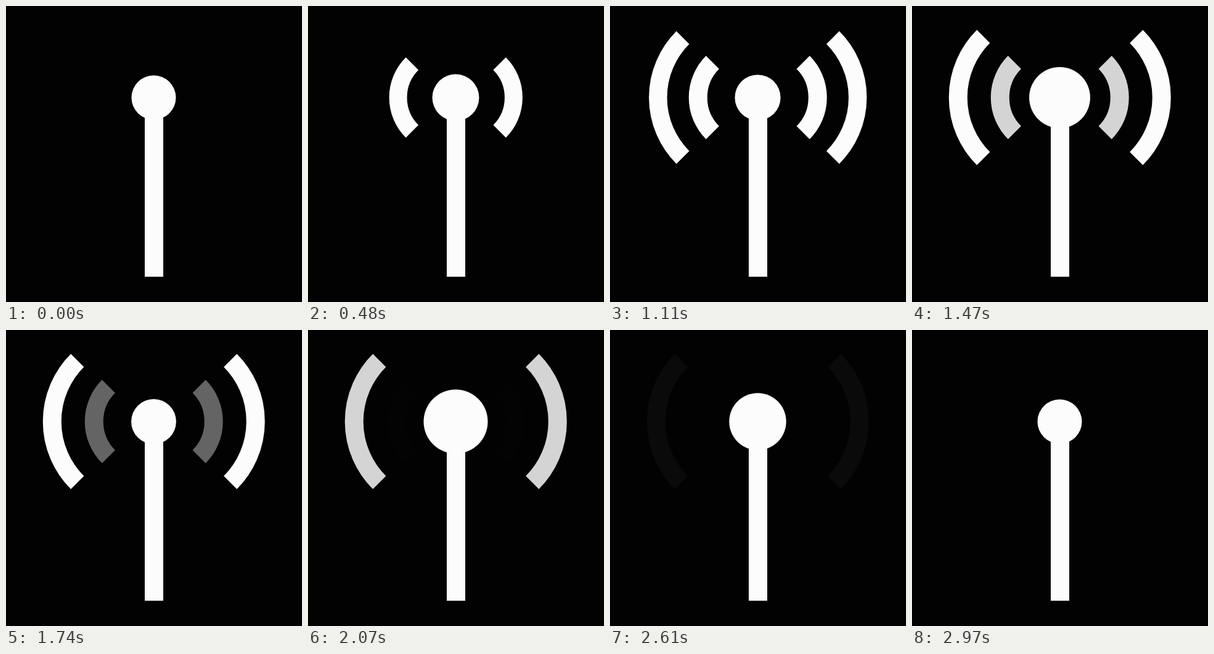
Animation, 480 px wide and 480 px high, one loop 3000 ms. Source, as an HTML page:

```html
<!DOCTYPE html>
<html lang="en">
<head>
<meta charset="utf-8">
<title>Radio mast</title>
<style>
  html, body { margin: 0; width: 100%; height: 100%; overflow: hidden; background: #020202; }
  svg { display: block; width: 100%; height: 100%; }
</style>
</head>
<body>
<svg viewBox="0 0 480 480">
  <g id="waves" fill="none" stroke="#fcfcfc" stroke-width="30"></g>
  <rect x="225" y="148" width="30" height="291" fill="#fcfcfc"/>
  <circle id="bulb" cx="239.5" cy="148.5" r="36" fill="#fcfcfc"/>
</svg>
<script>
const STEP = 30, STEPS = 100;
const CENTER = [239.75, 148.4];
const PEAKS = [10, 30, 50, 69, 89];
const WAVES = [
  { radius: 80.5, offset: 16.5, grow: 0, fade: 42 },
  { radius: 140, offset: 25, grow: 20, fade: 62 },
];

const clamp = x => Math.min(1, Math.max(0, x));
const smooth = x => x * x * (3 - 2 * x);

// Cubic Bezier easing, solved by bisection
function bezier(x1, y1, x2, y2) {
  const at = (s, a, b) => 3 * s * (1 - s) ** 2 * a + 3 * s * s * (1 - s) * b + s ** 3;
  return x => {
    if (x <= 0 || x >= 1) return clamp(x);
    let low = 0, high = 1;
    for (let i = 0; i < 24; i++) {
      const mid = (low + high) / 2;
      if (at(mid, x1, x2) < x) low = mid; else high = mid;
    }
    return at(low, y1, y2);
  };
}
const growEase = bezier(1 / 3, 0, 1 / 3, 1);
const pulseEase = bezier(1 / 6, 1 / 6, 1 / 3, 1);

// Quarter arcs on both sides of the mast, mirrored around x = 0
function arcPair({ radius, offset }) {
  const k = radius * Math.SQRT1_2;
  const side = (dir, sweep) =>
    `M${dir * (offset + k)} ${-k}A${radius} ${radius} 0 0 ${sweep} ${dir * (offset + k)} ${k}`;
  return side(-1, 0) + side(1, 1);
}

const group = document.getElementById('waves');
const bulb = document.getElementById('bulb');
for (const wave of WAVES) {
  wave.path = document.createElementNS('http://www.w3.org/2000/svg', 'path');
  wave.path.setAttribute('d', arcPair(wave));
  group.append(wave.path);
}

function draw(ms) {
  const step = Math.floor(ms / STEP) % STEPS;
  const away = Math.min(...PEAKS.map(peak => Math.abs(step - peak))) / 10;
  bulb.setAttribute('r', 52 - 16 * pulseEase(clamp(away)));
  for (const { path, grow, fade } of WAVES) {
    const scale = growEase(clamp((step - grow) / 20));
    const opacity = scale > 0 ? 1 - smooth(clamp((step - fade) / 28)) : 0;
    path.setAttribute('transform', `translate(${CENTER}) scale(${scale || 0.001})`);
    path.setAttribute('opacity', opacity);
  }
}

let start;
function tick(now) {
  start ??= now;
  draw(now - start);
  requestAnimationFrame(tick);
}
draw(0);
requestAnimationFrame(tick);
</script>
</body>
</html>
```
